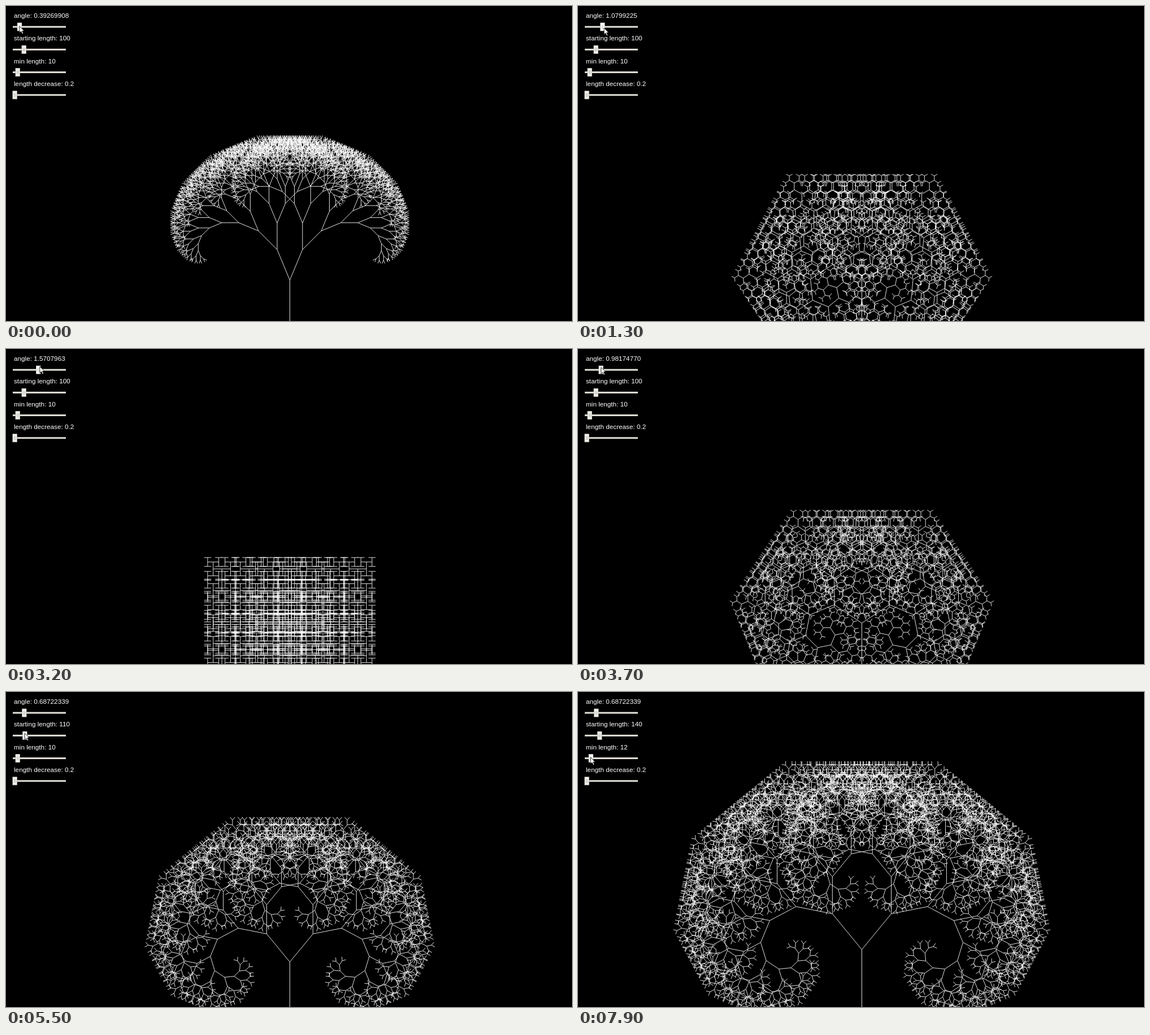
Write an HTML page with a canvas that moves like this. It is 1002 px wide and 559 px high and loops after 8 s.

```html
<!DOCTYPE html>
<html lang="en">
<head>
<meta charset="utf-8">
<title>Fractal tree</title>
<style>
  html, body { margin: 0; width: 100%; height: 100%; overflow: hidden; background: #000; }
  canvas { position: absolute; left: 0; top: 0; }
  .label {
    position: absolute; left: 14px; color: #fff; white-space: pre;
    font: 11.74px/16px "Liberation Sans", Arial, sans-serif;
  }
</style>
</head>
<body>
<canvas id="stage" width="1002" height="559"></canvas>
<script>
const LOOP = 8000, TICK = 100, UNIT = 0.7335, ROOT_X = 502.45, ROOT_Y = 559.8, ROW = 40.3;
const ctx = document.getElementById('stage').getContext('2d');

const labels = [0, 1, 2, 3].map(i => {
  const el = document.createElement('div');
  el.className = 'label';
  el.style.top = 9.1 + i * ROW + 'px';
  document.body.append(el);
  return el;
});

const clamp = (v, lo, hi) => Math.min(hi, Math.max(lo, v));

function branch(x, y, dir, len, angle, min) {
  const x2 = x + Math.sin(dir) * len * UNIT;
  const y2 = y - Math.cos(dir) * len * UNIT;
  ctx.beginPath();
  ctx.moveTo(x, y);
  ctx.lineTo(x2, y2);
  ctx.stroke();
  if (len <= min) return;
  branch(x2, y2, dir + angle, len * 0.8, angle, min);
  branch(x2, y2, dir - angle, len * 0.8, angle, min);
}

function rect(color, x, y, w, h) {
  ctx.fillStyle = color;
  ctx.fillRect(x, y, w, h);
}

function slider(row, x, cx, cy) {
  const y = 37 + row * ROW;
  const hover = Math.abs(cx - x) < 4 && Math.abs(cy - y) < 7.5;
  rect('#e4e2da', 12, y - 1.5, 94, 3);
  rect('#aaa9a2', x - 4.2, y - 7.5, 8.4, 15);
  rect(hover ? '#fff' : '#f1f0eb', x - 3.6, y - 6.9, 7.2, 13.8);
  for (let d = -2.5; d < 3; d += 2.2) rect('#aaa9a2', x - 2, y + d, 4, 0.8);
}

function cursor(x, y) {
  ctx.save();
  ctx.translate(x, y);
  const arrow = new Path2D('M0 0V11.5L2.7 9L4.7 13.6L6.7 12.7L4.7 8.3H8.2Z');
  ctx.fillStyle = '#fff';
  ctx.fill(arrow);
  ctx.strokeStyle = '#000';
  ctx.lineWidth = 0.8;
  ctx.stroke(arrow);
  ctx.restore();
}

function draw(t) {
  const ramp = (from, to) => clamp((t - from) / (to - from), 0, 1);

  // The angle is dragged up, then back down; length and minimum follow in steps.
  const n = Math.round(8 + 14 * ramp(900, 1300) + 17 * ramp(1300, 1700) + 5 * ramp(1800, 2100)
    - 12 * ramp(2500, 3200) - 10 * ramp(3200, 3500) - 6 * ramp(3600, 3900) - 2 * ramp(4000, 4100));
  const angle = n * Math.PI / 64;
  const len = 100 + 10 * clamp(Math.floor((t - 5300) / 200), 0, 4);
  const min = 10 + 2 * ramp(7700, 7900);
  const thumbs = [12.9 + n * 1.387, 15.2 + len * 0.165, 9.7 + min * 1.1, 15.6];

  // The pointer runs a little ahead of the angle thumb, then visits the next two rows.
  const cx = thumbs[0] + (n - 8) * 0.19 - 2 * ramp(2500, 3200)
    + (len - 100) * 0.165 - 19 * ramp(6400, 7000) + ramp(7200, 7300) + (min - 10) * 1.1;
  const cy = 36 + 3 * ramp(900, 1300) - 8 * ramp(2500, 3200) + 2 * ramp(3200, 3900)
    + 35 * ramp(4300, 4600) + 5 * ramp(4700, 5000) + 43 * ramp(6400, 7000);

  rect('#000', 0, 0, 1002, 559);
  ctx.strokeStyle = '#fff';
  ctx.lineWidth = 0.88;
  branch(ROOT_X, ROOT_Y, 0, len, angle, min);
  thumbs.forEach((x, i) => slider(i, x, cx, cy));
  cursor(cx, cy);

  [`angle: ${angle.toPrecision(8)}`, `starting length: ${len}`, `min length: ${min}`,
    'length decrease: 0.2'].forEach((text, i) => labels[i].textContent = text);
}

let shown = -1;
function frame() {
  const t = Math.floor(performance.now() % LOOP / TICK) * TICK;
  if (t !== shown) draw(shown = t);
  requestAnimationFrame(frame);
}
frame();
</script>
</body>
</html>
```
